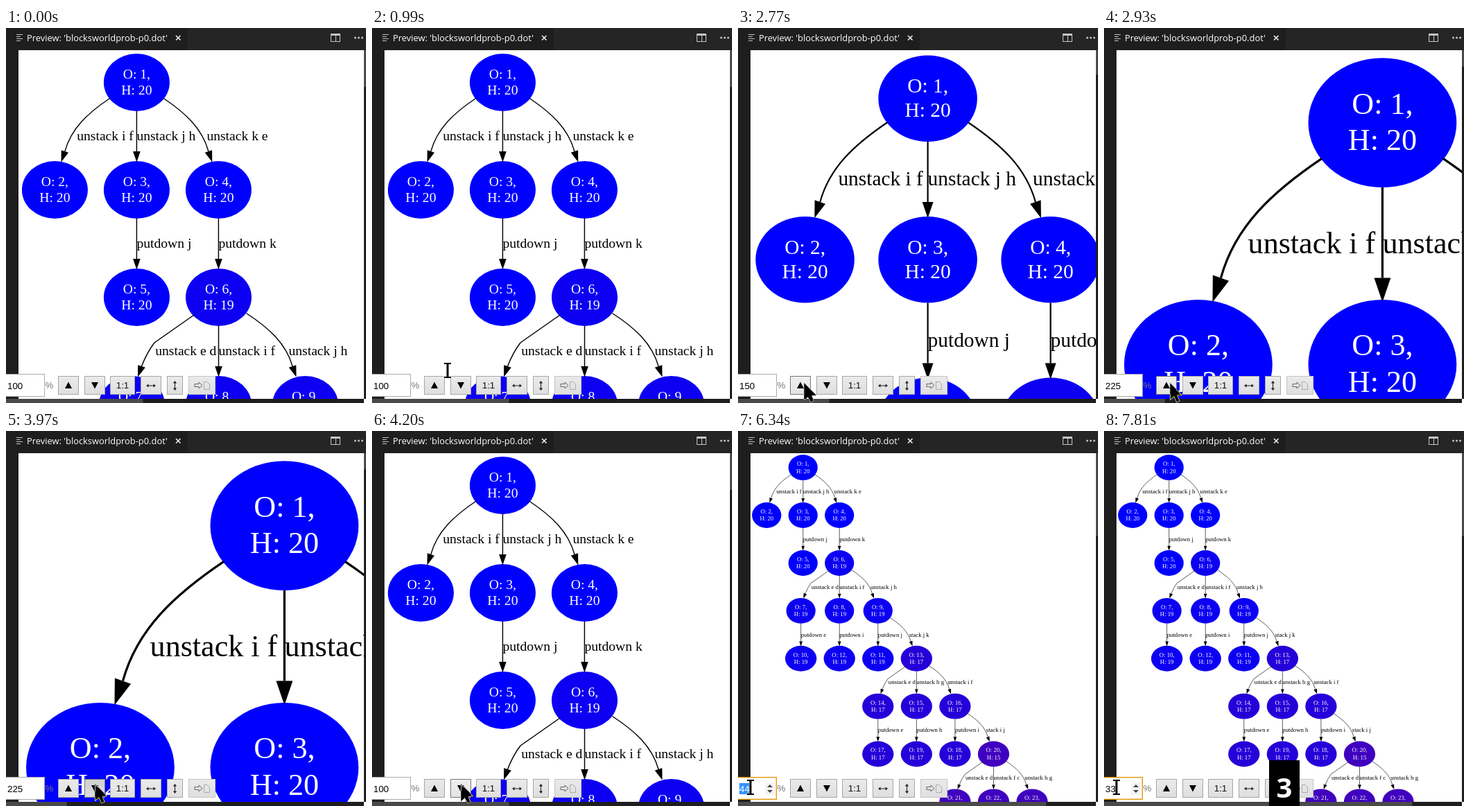
Animation, 519 px wide and 541 px high, one loop 8 s. Source, as an HTML page with a canvas:

```html
<!DOCTYPE html>
<html lang="en">
<head>
<meta charset="utf-8">
<title>Graph preview</title>
<style>
html, body { margin: 0; width: 100%; height: 100%; overflow: hidden; background: #1e1e1e; }
canvas { display: block; }
</style>
</head>
<body>
<canvas id="stage" width="519" height="541"></canvas>
<script>
const ctx = document.getElementById('stage').getContext('2d');
const LOOP = 8000, ROW = 155, COL = 125;
const SERIF = '19.6px "Liberation Serif", "Times New Roman", serif';
const SANS = '13.33px "Liberation Sans", Arial, sans-serif';

const nodes = [], edges = [];

function addNode(id, x, row, h) {
  nodes.push({ id, x, y: 46.5 + ROW * row, h });
}

function addEdge(x, row, dx, label) {
  edges.push({ x, y: 46.5 + ROW * row, dx, label, kink: dx < 0 && row > 0 });
}

// The search tree: a root, then equal stages stepping down to the right
function buildTree() {
  const rootX = 170.4, gap = 118;
  addNode(1, rootX, 0, 20);
  ['i f', 'j h', 'k e'].forEach((pair, j) => {
    const dx = (j - 1) * gap;
    addNode(2 + j, rootX + dx, 1, 20);
    addEdge(rootX, 0, dx, 'unstack ' + pair);
    if (j) addEdge(rootX + dx, 1, 0, 'putdown ' + pair[0]);
  });
  addNode(5, rootX, 2, 20);

  const stages = [['e d', 'i f', 'j h', 'j k'], ['e d', 'h g', 'i f', 'i j'], ['e d', 'f c', 'h g']];
  stages.forEach(([a, b, c, stack], i) => {
    const cx = 288.5 + 2 * COL * i, row = 2 + 2 * i, id = 6 + 7 * i, h = 19 - 2 * i;
    addNode(id, cx, row, h);
    [a, b, c].forEach((pair, j) => {
      const dx = (j - 1) * COL;
      addNode(id + 1 + j, cx + dx, row + 1, h);
      addEdge(cx, row, dx, 'unstack ' + pair);
      addNode(id + 4 + (3 - j) % 3, cx + dx, row + 2, h);
      addEdge(cx + dx, row + 1, 0, 'putdown ' + pair[0]);
    });
    if (stack) addEdge(cx + COL, row + 1, COL, 'stack ' + stack);
  });
}
buildTree();

const zooms = [[0, 1, '100'], [2770, 1.5, '150'], [2930, 2.25, '225'], [4200, 1, '100'],
  [4600, 4 / 9, '44'], [7660, 4 / 9, '3'], [7810, 4 / 9, '33']];

// Pointer moves: start, tick, [step, x, y]...; a step without x leaves the stage
const moves = [
  [590, 78, [0, 84, 530], [5, 109, 494], [8, 279, 532], [9]],
  [1690, 75, [0, 276, 539], [1, 97, 539], [2]],
  [2550, 70, [0, 96, 534], [2, 96, 514]],
  [3230, 78, [0, 99, 514], [6, 129, 511]],
  [5290, 78, [0, 103, 512], [7, 18, 514]]
];

const buttons = [[75, 30], [113, 30], [150, 36], [194, 30], [232, 23], [263, 39]];

function rect(x, y, w, h, color) {
  ctx.fillStyle = color;
  ctx.fillRect(x, y, w, h);
}

function frameRect(x, y, w, h, color) {
  ctx.strokeStyle = color;
  ctx.lineWidth = 1;
  ctx.strokeRect(x + 0.5, y + 0.5, w - 1, h - 1);
}

function poly(pts, color) {
  ctx.beginPath();
  for (let i = 0; i < pts.length; i += 2) ctx.lineTo(pts[i], pts[i + 1]);
  ctx.closePath();
  if (color) { ctx.fillStyle = color; ctx.fill(); }
}

function line(pts, color, width = 1) {
  ctx.strokeStyle = color;
  ctx.lineWidth = width;
  poly(pts);
  ctx.stroke();
}

function ellipse(x, y, rx, ry, color) {
  ctx.beginPath();
  ctx.ellipse(x, y, rx, ry, 0, 0, 7);
  ctx.fillStyle = color;
  ctx.fill();
}

function text(s, x, y, font, color, align = 'left') {
  ctx.font = font;
  ctx.fillStyle = color;
  ctx.textAlign = align;
  ctx.fillText(s, x, y);
}

function pointerAt(t) {
  const move = moves.filter(m => m[0] <= t).pop();
  if (!move) return null;
  const [start, tick, ...keys] = move;
  const step = Math.floor((t - start) / tick);
  let i = keys.length - 1;
  while (keys[i][0] > step) i--;
  const a = keys[i], b = keys[i + 1];
  if (a.length < 2) return null;
  if (!b || b.length < 2) return { x: a[1], y: a[2] };
  const p = (step - a[0]) / (b[0] - a[0]);
  return { x: a[1] + (b[1] - a[1]) * p, y: a[2] + (b[2] - a[2]) * p };
}

function drawNode({ id, x, y, h }) {
  const red = Math.round(255 * (20 - h) / 20);
  ellipse(x, y, id > 9 ? 51 : 47.5, 41.5, `rgb(${red},0,${255 - red})`);
  text(`O: ${id},`, x, y - 5.8, SERIF, '#fff', 'center');
  text(`H: ${h}`, x, y + 17.7, SERIF, '#fff', 'center');
}

function drawEdge({ x, y, dx, label, kink }) {
  // Side edges are drawn rightwards and mirrored
  const side = Math.sign(dx);
  const stretch = 0.5 + Math.abs(dx) / COL / 2;
  const endX = !side ? 0 : kink ? 111 : 106.5;
  const lean = side ? 5.5 : 0;
  ctx.save();
  ctx.translate(x, y);
  ctx.scale(side < 0 ? -stretch : side ? stretch : 1, 1);
  ctx.beginPath();
  if (!side) {
    ctx.moveTo(0, 41.5);
    ctx.lineTo(0, 99.5);
  } else if (kink) {
    ctx.moveTo(35.5, 25.5);
    ctx.lineTo(92.5, 65.5);
    ctx.quadraticCurveTo(103, 79, endX, 99.5);
  } else {
    ctx.moveTo(40, 23);
    ctx.bezierCurveTo(72, 44, 97, 66, endX, 99.5);
  }
  ctx.strokeStyle = '#000';
  ctx.lineWidth = 1.45;
  ctx.stroke();
  const tilt = lean / 3;
  poly([endX - 5.3, 99.5 + tilt, endX + lean, 115, endX + 5.3, 99.5 - tilt], '#000');
  ctx.restore();
  text(label, x + (side < 0 ? dx * 0.73 : side * 101), y + 83.7, SERIF, '#000');
}

function drawGraph(scale) {
  rect(18, 32, 498, 503, '#fff');
  ctx.save();
  ctx.beginPath();
  ctx.rect(18, 32, 498, 503);
  ctx.clip();
  ctx.translate(18, 32);
  ctx.scale(scale, scale);
  nodes.forEach(drawNode);
  edges.forEach(drawEdge);
  ctx.restore();
  rect(516, 32, 3, 53 / scale, '#4a4a4a');
  rect(0, 535, 197.5 / scale, 6, '#4a4a4a');
  rect(516, 535, 3, 6, '#fff');
}

function drawTitle() {
  const gray = '#c5c5c5';
  rect(0, 0, 519, 32, '#252526');
  rect(0, 0, 262, 32, '#1e1e1e');
  for (let i = 0; i < 4; i++) rect(15, 9 + i * 3, i % 2 ? 6 : 9, 1, gray);
  text("Preview: 'blocksworldprob-p0.dot'", 30, 18.5, '12.88px "Open Sans", "Noto Sans", sans-serif', '#fff');
  line([245, 11, 251.5, 17.5], '#e8e8e8', 1.7);
  line([251.5, 11, 245, 17.5], '#e8e8e8', 1.7);
  frameRect(468, 9, 14, 11, gray);
  rect(468, 8, 14, 3, gray);
  rect(475, 10, 1, 10, gray);
  for (let i = 0; i < 3; i++) ellipse(503.5 + i * 5, 14, 1.5, 1.5, gray);
}

function doubleArrow(x, y, angle) {
  ctx.save();
  ctx.translate(x, y);
  ctx.rotate(angle);
  line([-6, 0, 6, 0], '#222', 1.1);
  for (const s of [-1, 1]) poly([s * 7, 0, s * 3.5, -2.6, s * 3.5, 2.6], '#222');
  ctx.restore();
}

function drawInput(t, value, ptr) {
  const focus = t >= 6170, selected = t >= 6340 && t < 7660;
  rect(0, 499, 56, 33, '#fff');
  frameRect(-1, 499, 57, 33, focus ? '#e59700' : '#a9a9a9');
  if (focus) frameRect(-1, 500, 56, 31, '#f3d6a0');
  if (selected) rect(2, 508, 15, 16, '#3390ff');
  text(value, 2, 521, SANS, selected ? '#fff' : '#000');
  if (ptr && ptr.x < 56) {
    rect(39, 507, 14, 18, '#f4f4f4');
    poly([42, 514, 46, 510, 50, 514], '#444');
    poly([42, 518, 46, 522, 50, 518], '#444');
  }
  text('%', 56.5, 520, SANS, '#777');
}

function drawButtons(t, ptr) {
  const pressed = (t >= 3970 && t < 4200) || (t >= 4370 && t < 4600);
  buttons.forEach(([x, w], i) => {
    const hover = ptr && ptr.y >= 502 && ptr.y < 529 && ptr.x >= x && ptr.x < x + w;
    const fill = ctx.createLinearGradient(0, 502, 0, 529);
    fill.addColorStop(0, hover && pressed ? '#d0d0d0' : hover ? '#f0f0f0' : '#ebebeb');
    fill.addColorStop(1, hover && pressed ? '#dcdcdc' : hover ? '#e2e2e2' : '#dedede');
    rect(x, 502, w, 27, fill);
    frameRect(x, 502, w, 27, hover ? '#777' : i === 5 ? '#c4c4c4' : '#a6a6a6');
  });
  poly([85, 520, 90, 510.5, 95, 520], '#000');
  poly([123, 511, 128, 520.5, 133, 511], '#000');
  text('1:1', 168, 520, SANS, '#111', 'center');
  doubleArrow(209, 516, 0);
  doubleArrow(243.5, 516, Math.PI / 2);
  line([272, 513.5, 278, 513.5, 278, 511, 283, 515.5, 278, 520, 278, 517.5, 272, 517.5], '#666');
  line([285.5, 510.5, 290, 510.5, 293.5, 514, 293.5, 521.5, 285.5, 521.5], '#aaa');
}

function drawPointer({ x, y }) {
  const beam = y < 500 || x < 56;
  ctx.save();
  ctx.translate(x, y);
  if (beam) {
    for (const [color, pad] of [['#fff', 0.5], ['#000', 0]]) {
      for (const top of [-11, 9]) rect(-5 - pad, top - pad, 10 + 2 * pad, 2 + 2 * pad, color);
      rect(-1.5 - pad, -10, 3 + 2 * pad, 20, color);
    }
    rect(-5, -11, 10, 2, '#000');
  } else {
    ctx.scale(1.27, 1.27);
    const arrow = [0, 0, 0, 17, 4, 13.3, 7, 20, 10, 18.8, 7, 12.2, 12, 12];
    // The outline inverts what lies below it
    ctx.globalCompositeOperation = 'difference';
    line(arrow, '#fff', 1.25);
    ctx.globalCompositeOperation = 'source-over';
    poly(arrow, '#000');
  }
  ctx.restore();
}

function draw(t) {
  const [, scale, value] = zooms.filter(z => z[0] <= t).pop();
  const ptr = pointerAt(t);
  rect(0, 0, 519, 541, '#1e1e1e');
  drawTitle();
  drawGraph(scale);
  drawInput(t, value, ptr);
  drawButtons(t, ptr);
  if (t >= 7660) {
    rect(238, 475, 44, 66, '#000');
    text('3', 260, 529, 'bold 40px "Open Sans", "Noto Sans", sans-serif', '#fff', 'center');
  }
  if (ptr) drawPointer(ptr);
}

const begin = performance.now();
function frame() {
  draw((performance.now() - begin) % LOOP);
  requestAnimationFrame(frame);
}
frame();
</script>
</body>
</html>
```
